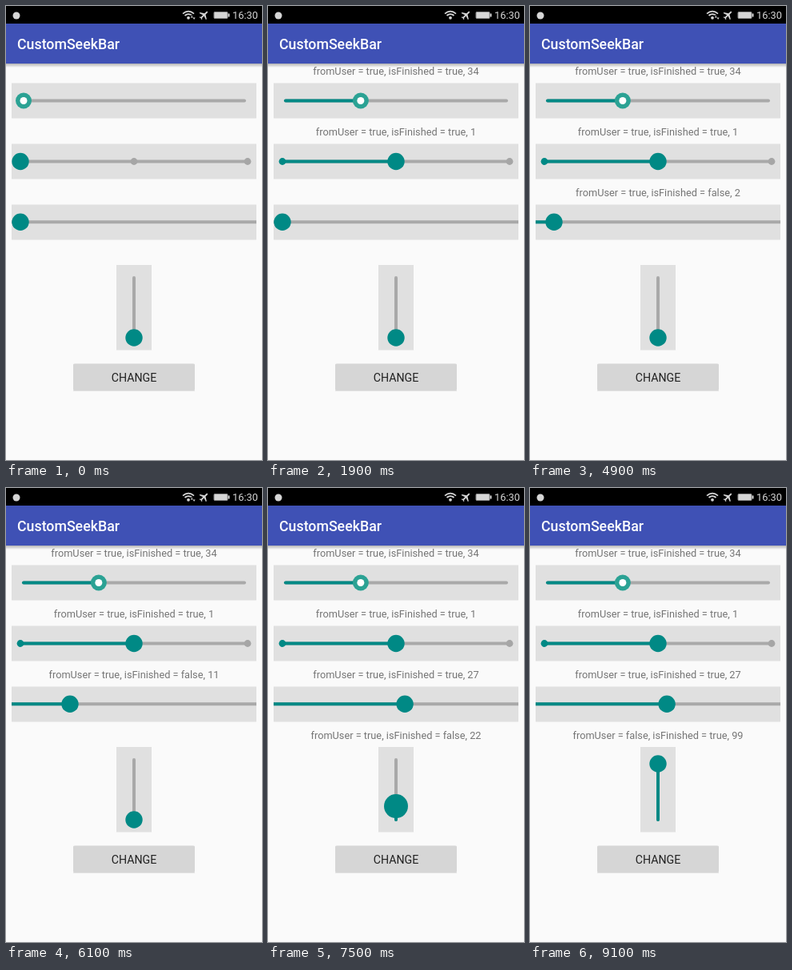
Write an HTML page that moves like this. It is 320x568 px and loops after 9.2 s.

```html
<!DOCTYPE html>
<html lang="en">
<head>
<meta charset="utf-8">
<title>CustomSeekBar</title>
<style>
  html, body { margin: 0; width: 100%; height: 100%; overflow: hidden; background: #fafafa; }
  svg { display: block; width: 320px; height: 568px; font-family: Roboto, sans-serif; }
  .panel { fill: #e0e0e0; }
  .track, .fill { stroke-width: 4; stroke-linecap: round; }
  .track { stroke: #a9a9a9; }
  .fill { stroke: #008985; }
  .flat { stroke-linecap: butt; }
  .thumb { fill: #008985; }
  .note { font-size: 12.75px; fill: #757575; text-anchor: middle; }
  .icon { fill: #d6d6d6; }
  .wave { fill: none; stroke: #d6d6d6; stroke-width: 1.7; }
</style>
</head>
<body>
<svg id="stage" viewBox="0 0 320 568">
  <defs>
    <linearGradient id="shade" x2="0" y2="1">
      <stop stop-color="#000" stop-opacity=".28"/>
      <stop offset="1" stop-color="#000" stop-opacity="0"/>
    </linearGradient>
  </defs>
  <rect width="320" height="568" fill="#fafafa"/>
  <rect y="72" width="320" height="5" fill="url(#shade)"/>
  <rect width="320" height="22" fill="#000"/>
  <rect y="22" width="320" height="50" fill="#3f51b5"/>
  <text x="14" y="54" font-size="17.78" font-weight="500" fill="#fff">CustomSeekBar</text>

  <circle class="icon" cx="13" cy="12" r="4.5"/>
  <path class="wave" d="M221 9.6Q228 3.6 235 9.6M223.5 12Q228 8.2 232.5 12"/>
  <circle class="icon" cx="228" cy="14.8" r="1.9"/>
  <g id="traffic">
    <rect x="230.5" y="11.5" width="6" height="6" fill="#000"/>
    <path class="icon" d="M230.8 14.5l1.5-2.5 1.5 2.5zM233.6 14.5h3l-1.5 2.5z"/>
  </g>
  <path class="icon" transform="translate(247.5 11.3) rotate(45) scale(.62) translate(-11.5 -12)"
    d="M21 16v-2l-8-5V3.5C13 2.67 12.33 2 11.5 2S10 2.67 10 3.5V9l-8 5v2l8-2.5V19l-2 1.5V22l3.5-1 3.5 1v-1.5L13 19v-5.5z"/>
  <rect x="260" y="7.5" width="17" height="8" rx="1" fill="#d6d6d6" stroke="#8c8c8c"/>
  <rect class="icon" x="277.5" y="9.5" width="2" height="4"/>
  <text class="icon" x="283" y="16" font-size="12.8">16:30</text>

  <g id="bars"></g>

  <rect x="84" y="481" width="152" height="1" fill="#000" opacity=".1"/>
  <rect id="button" x="84" y="447.5" width="152" height="33.5" rx="1.5"/>
  <text x="160" y="470" font-size="14.2" fill="#212121" text-anchor="middle">CHANGE</text>
</svg>
<script>
const LOOP = 9200, STEP = 100;
const $ = id => document.getElementById(id);

// Positions run along each track, from its zero end.
// Moves: [start, end, from, to, release time]
const bars = [
  { at: 'translate(22 118.5)', panel: [7, 96.5, 306, 44], noteY: 86, line: [0, 276], unit: 2.76, r: 10,
    badge: true, moves: [[500, 1300, 0, 94.3, 1400]] },
  { at: 'translate(18 194.5)', panel: [7, 172.5, 306, 44], noteY: 162, line: [0, 284], unit: 142, r: 10.7,
    dots: [0, 142, 284],
    moves: [[1500, 1800, 0, 142, 1900], [2600, 3100, 142, 284, 3200], [3700, 4400, 284, 142, 4500]] },
  { at: 'translate(18 270.3)', panel: [7, 248.5, 306, 44], noteY: 238, line: [-11, 295], unit: 5.67, r: 10.7,
    flat: true, moves: [[4600, 4900, 0, 12, Infinity], [5800, 6700, 12, 154, 6800]] },
  { at: 'translate(160 415) rotate(-90)', panel: [138, 324, 44, 106.5], noteY: 314, line: [0, 75], unit: .76, r: 10.7,
    moves: [[7200, 7800, 0, 28, 7900]], auto: { start: 8600, from: 28, to: 70, value: 99 } }
];

function add(parent, tag, attrs) {
  const el = document.createElementNS('http://www.w3.org/2000/svg', tag);
  for (const k in attrs) el.setAttribute(k, attrs[k]);
  return parent.appendChild(el);
}

function build(bar) {
  const [x, y, width, height] = bar.panel, [x1, x2] = bar.line;
  const cap = bar.flat ? ' flat' : '';
  add($('bars'), 'rect', { class: 'panel', x, y, width, height });
  bar.note = add($('bars'), 'text', { class: 'note', x: 160, y: bar.noteY });
  const g = add($('bars'), 'g', { transform: bar.at });
  add(g, 'line', { class: 'track' + cap, x1, x2 });
  bar.fill = add(g, 'line', { class: 'fill' + cap, x1, x2: x1 });
  bar.marks = (bar.dots || []).map(cx => add(g, 'circle', { cx, r: 4.4 }));
  bar.thumb = add(g, 'circle', { class: 'thumb', r: bar.r });
  if (bar.badge) {
    bar.thumb.style.fill = '#2ba294';
    bar.mark = add(g, 'circle', { r: 4.5, fill: '#fff' });
  }
}

const message = (user, done, value) => `fromUser = ${user}, isFinished = ${done}, ${value}`;
const clamp = v => Math.min(1, Math.max(0, v));

function stateAt(bar, t) {
  const { auto, unit } = bar;
  if (auto && t >= auto.start) {
    const k = clamp((t - auto.start + STEP) / 600);
    return { pos: auto.from + (auto.to - auto.from) * k, text: message(false, true, auto.value) };
  }
  const move = bar.moves.filter(m => t >= m[0]).pop();
  if (!move) return { pos: 0, text: '' };
  const [start, end, from, to, release] = move;
  const k = clamp((t - start + STEP) / (end - start + STEP));
  const pos = from + (to - from) * k * k * (3 - 2 * k);
  const value = Math.round(pos / unit), done = t >= release;
  return { pos: done ? value * unit : pos, text: message(true, done, value) };
}

function draw(bar, t) {
  const { pos, text } = stateAt(bar, t);
  bar.note.textContent = text;
  bar.fill.setAttribute('x2', pos);
  bar.fill.style.opacity = pos > 0 ? 1 : 0;
  bar.thumb.setAttribute('cx', pos);
  if (bar.mark) bar.mark.setAttribute('cx', pos);
  bar.marks.forEach((dot, i) => dot.setAttribute('fill', bar.dots[i] <= pos ? '#008985' : '#a6a6a6'));
  if (bar.auto) bar.thumb.setAttribute('r', t >= bar.moves[0][0] && t < bar.auto.start ? 15 : bar.r);
}

function frame(now) {
  const t = Math.floor(now % LOOP / STEP) * STEP;
  bars.forEach(bar => draw(bar, t));
  const busy = t < 1500 || t >= 2600 && t < 3600 || t >= 4600 && t < 7200;
  $('traffic').style.opacity = busy ? 1 : 0;
  const press = t < 8600 ? clamp((t - 7900) / 200) : clamp((8900 - t) / 400);
  const shade = Math.round(214 - 25 * press);
  $('button').setAttribute('fill', `rgb(${shade},${shade},${shade})`);
  requestAnimationFrame(tick);
}

bars.forEach(build);
const begin = performance.now();
const tick = () => frame(performance.now() - begin);
tick();
</script>
</body>
</html>
```
